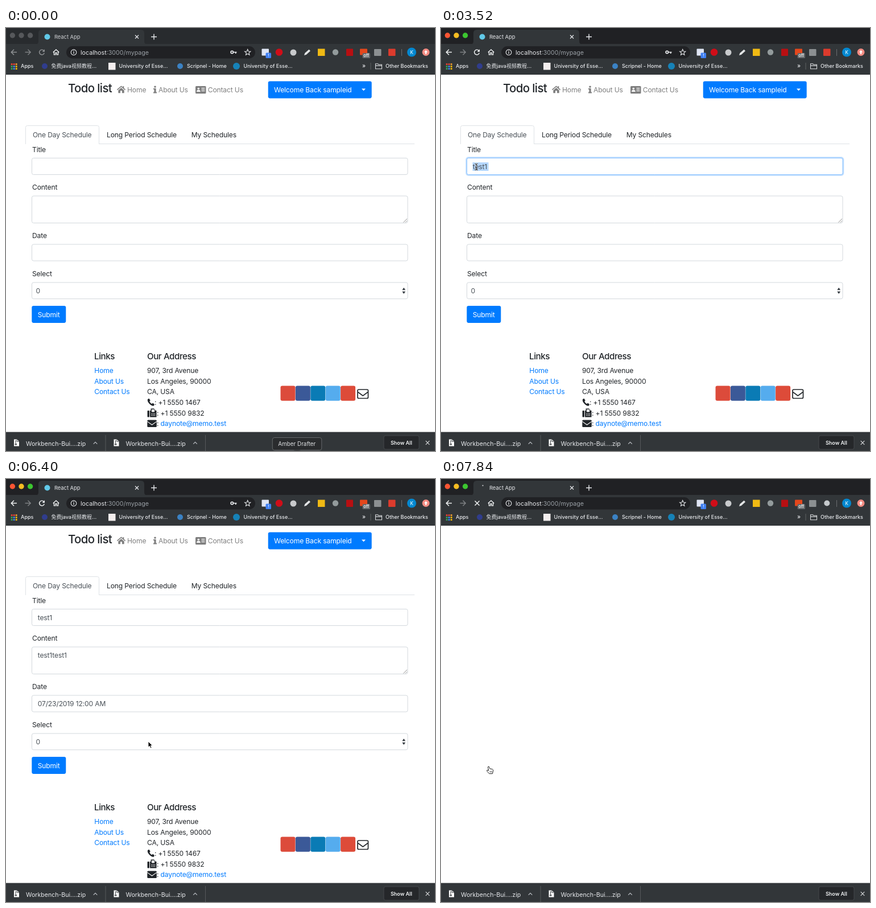
An HTML page with a canvas for the animation above (8 s loop, 754 by 743 pixels).

```html
<!DOCTYPE html>
<html lang="en">
<head>
<meta charset="utf-8">
<title>Todo list</title>
<style>
html, body { margin: 0; width: 100%; height: 100%; overflow: hidden; background: #fff; }
canvas { display: block; width: 754px; height: 743px; }
</style>
</head>
<body>
<canvas id="stage"></canvas>
<script>
const W = 754, H = 743, LOOP = 8000, STEP = 160;
const canvas = document.getElementById('stage');
const ctx = canvas.getContext('2d');
const dpr = window.devicePixelRatio || 1;
canvas.width = W * dpr;
canvas.height = H * dpr;

const BLUE = '#007bff', INK = '#212529', FIELD = '#495057', MUTED = '#7f7f7f';
const BAR = '#323639', LIGHT = '#e8eaed', DIM = '#9aa0a6';

// Moments when the state changes, in ms
const AT = {
  active: 320, title: 1280, select: 3200, content: 4160, paste: 4320, paste2: 4480,
  date: 4960, pick: 5600, closeCal: 6080, open: 6560, close: 7360, submit: 7520, reload: 7840
};
const typed = [[1920, 't'], [2080, 'tes'], [2240, 'test'], [2400, 'test1']];

// Pointer: time, x, y, shape
const route = [
  [480, 480, 690, 'arrow'], [640, 400, 480, 'arrow'], [800, 255, 290, 'arrow'],
  [960, 203, 232, 'beam'], [2400, 203, 232, 'beam'], [2880, 90, 244, 'beam'],
  [3520, 62, 244, 'beam'], [4000, 93, 310, 'beam'], [4480, 93, 310, 'beam'],
  [4800, 112, 390, 'beam'], [4960, 112, 390, 'beam'], [5120, 113, 450, 'arrow'],
  [5280, 113, 504, 'hand'], [5440, 116, 532, 'hand'], [5760, 116, 532, 'hand'],
  [6080, 262, 428, 'arrow'], [6400, 250, 461, 'arrow'], [6560, 250, 461, 'arrow'],
  [7040, 166, 529, 'arrow'], [7200, 166, 529, 'arrow'], [7520, 84, 505, 'hand']
];

function pointerAt(t) {
  let i = -1;
  while (i + 1 < route.length && route[i + 1][0] <= t) i++;
  if (i < 0) return null;
  const a = route[i], b = route[i + 1] || a;
  const k = b === a ? 0 : (t - a[0]) / (b[0] - a[0]);
  return { x: a[1] + (b[1] - a[1]) * k, y: a[2] + (b[2] - a[2]) * k, kind: a[3] };
}

function rect(x, y, w, h, fill) {
  ctx.fillStyle = fill;
  ctx.fillRect(x, y, w, h);
}
function box(x, y, w, h, r, fill, stroke, lw = 1) {
  ctx.beginPath();
  ctx.roundRect(x, y, w, h, r);
  if (fill) { ctx.fillStyle = fill; ctx.fill(); }
  if (stroke) { ctx.strokeStyle = stroke; ctx.lineWidth = lw; ctx.stroke(); }
}
function dot(x, y, r, fill, stroke, lw = 1) {
  ctx.beginPath();
  ctx.arc(x, y, r, 0, Math.PI * 2);
  if (fill) { ctx.fillStyle = fill; ctx.fill(); }
  if (stroke) { ctx.strokeStyle = stroke; ctx.lineWidth = lw; ctx.stroke(); }
}
function shape(d, x, y, fill, stroke, lw = 1) {
  const p = new Path2D(d);
  ctx.save();
  ctx.translate(x, y);
  if (fill) { ctx.fillStyle = fill; ctx.fill(p, 'evenodd'); }
  if (stroke) { ctx.strokeStyle = stroke; ctx.lineWidth = lw; ctx.stroke(p); }
  ctx.restore();
}
function text(s, x, y, size, color, weight = 400, track = 0, align = 'left') {
  ctx.font = `${weight} ${size}px Inter, "Noto Sans CJK SC", "Noto Sans CJK", sans-serif`;
  ctx.letterSpacing = `${track * size}px`;
  ctx.textAlign = align;
  ctx.fillStyle = color;
  ctx.fillText(s, x, y);
  return ctx.measureText(s).width;
}
const body = (s, x, y, color = INK, weight = 400, align = 'left') =>
  text(s, x, y, 12.1, color, weight, -0.012, align);
const heading = (s, x, y, size) => text(s, x, y, size, INK, 500, -0.03);
const small = (s, x, y, color = LIGHT, weight = 500) => text(s, x, y, 9, color, weight);
const cross = (x, y, r, color, lw) =>
  shape(`M${-r} ${-r}L${r} ${r}M${r} ${-r}L${-r} ${r}`, x, y, null, color, lw);

function drawTabs(active, loading) {
  rect(0, 0, W, 29, active ? '#202124' : '#282b2e');
  const lights = active ? ['#fb5533', '#f6bd22', '#3cc630'] : ['#56585b', '#56585b', '#56585b'];
  lights.forEach((c, i) => dot(11.4 + 15.6 * i, 13, 4.7, c));
  shape('M51 29Q57 29 57 23V9Q57 3 63 3H237Q243 3 243 9V23Q243 29 249 29Z', 0, 0, BAR);
  if (loading) dot(73.5, 11.5, 1.1, '#d5d7da');
  else dot(72.5, 15.5, 5, '#61c9e8');
  text('React App', 85, 19, 9.3, active ? LIGHT : '#d0d2d5');
  cross(230, 15.5, 3, LIGHT, 1.2);
  shape('M-5 0H5M0-5V5', 260, 15.5, null, LIGHT, 1.4);
}

function drawToolbar(active, loading) {
  rect(0, 28, W, 54, BAR);
  const nav = active ? '#f1f3f4' : '#8f9295';
  shape('M5 0H-4.6M0-4.7L-4.7 0 0 4.7', 14, 42.5, null, nav, 1.5);
  shape('M-5 0H4.6M0-4.7L4.7 0 0 4.7', 38.5, 42.5, null, '#7f8285', 1.4);
  if (loading) cross(63.5, 42.5, 4, '#f1f3f4', 1.5);
  else {
    shape('M3.4-2.8A4.4 4.4 0 1 0 4.3 1.2', 63, 42.5, null, nav, 1.4);
    shape('M5-5.2V-.7H.5Z', 63, 42.5, nav);
  }
  shape('M-5.3 .3L0-4.6 5.3 .3M-3.6-1V4.4H-1.1V1H1.1V4.4H3.6V-1', 88, 42.5, null, '#f1f3f4', 1.3);

  box(106, 32, 332, 21.5, 10.7, '#202124');
  dot(119, 42.7, 4.8, null, LIGHT, 1.1);
  rect(118.4, 41.8, 1.3, 3.5, LIGHT);
  rect(118.4, 39.7, 1.3, 1.3, LIGHT);
  const w = text('localhost', 131, 46.6, 10.7, LIGHT);
  text(':3000/mypage', 131 + w, 46.6, 10.7, DIM);
  if (!loading) {
    dot(397.3, 42.5, 2.2, null, LIGHT, 1.7);
    shape('M399.5 42.5H405.5M403.7 42.5V45', 0, 0, null, LIGHT, 1.7);
  }
  let star = '';
  for (let i = 0; i < 10; i++) {
    const a = -Math.PI / 2 + i * Math.PI / 5, r = i % 2 ? 2.4 : 5.4;
    star += `${i ? 'L' : 'M'}${r * Math.cos(a)} ${r * Math.sin(a)}`;
  }
  shape(star + 'Z', 424.7, 42.9, null, LIGHT, 1.1);

  // Extensions as plain marks
  box(449.5, 36.5, 12.5, 12, 1, '#dfe5f4');
  box(456.5, 43.5, 9.5, 9.5, 1.5, '#3f7ff2');
  text('!', 461.2, 51, 7, '#fff', 500, 0, 'center');
  dot(480, 42.5, 6.3, '#d00d18');
  dot(505, 43, 5.5, '#c8cacc');
  shape('M-5.5 5.5L-4.2 1.5 3-4.8 5.5-2.3-1.5 4.2Z', 529.5, 42.5, '#e3e5e6');
  box(548, 36.5, 12.5, 12.5, 0, '#f0ba14');
  dot(579, 42.5, 5.2, '#939b9c');
  box(598, 36.5, 12, 12.5, 1, '#b80f12');
  box(622, 36.5, 13, 11, 1, '#e4471c');
  box(626.5, 44, 13.5, 9, 1.5, '#65696c');
  text('off', 633.2, 51, 7.4, '#fff', 500, 0, 'center');
  box(647, 37, 12.5, 12, 1, '#8c9092');
  if (loading) dot(678.3, 42.5, 5, '#c5c9cc');
  else box(672, 36.5, 12.5, 12.5, 1, '#dc3b2d');
  rect(695, 37, 1, 12, '#6b6e71');
  dot(713, 42.5, 8, '#0288d1');
  text('K', 713, 45.6, 8.5, '#fff', 400, 0, 'center');
  dot(738, 42.5, 6.5, '#f28b82');
  shape('M0-3.5L3.3 0H1.2V3.2H-1.2V0H-3.3Z', 738, 42.5, '#fff');

  // Bookmarks
  const grid = ['#ea4335', '#ea4335', '#f29a2e', '#34a853', '#4285f4', '#fbbc05', '#34a853', '#4285f4', '#fbbc05'];
  grid.forEach((c, i) => rect(8.8 + (i % 3) * 4, 62.2 + Math.floor(i / 3) * 4, 2.8, 2.8, c));
  small('Apps', 26, 70.4);
  dot(68, 67, 5, '#303d8d');
  small('免费java视频教程...', 79.5, 70.4);
  box(180, 61, 12.5, 12.5, 0, '#f3eeee');
  small('University of Esse...', 198.5, 70.4);
  dot(306, 67, 5, '#3b82c4');
  small('Scripnel - Home', 318, 70.4);
  dot(405, 67, 6, '#1682b8');
  small('University of Esse...', 417.5, 70.4);
  text('»', 626, 70.4, 10, LIGHT, 500);
  rect(640.5, 61, 1, 12, '#5f6265');
  shape('M-5.5-4.5H-1.5L0-3H5.5V4.5H-5.5ZM-5.5-1.2H5.5', 655, 67.3, null, '#d7d9db', 1.1);
  small('Other Bookmarks', 667, 70.4);
}

function drawDownloads() {
  rect(0, 709.6, W, 34, BAR);
  for (const x of [0, 175.5]) {
    shape('M14 722.5H19.3L23 726.2V734.5H14Z', x, 0, '#fff');
    shape('M19.2 722.7V726.3H22.8', x, 0, null, BAR, .9);
    shape('M17 724V729.5M16 730.5H18.5V732H16Z', x, 0, null, BAR, 1);
    text('Workbench-Bui....zip', 35 + x, 734, 10.6, LIGHT);
    shape('M-3.3 1.7L0-1.7 3.3 1.7', 157 + x, 729, null, '#bdc1c6', 1.2);
    rect(174.5 + x, 715, 1, 28, '#55585b');
  }
  box(664, 716, 62, 24, 3, '#25272a', '#44474a');
  small('Show All', 676, 731.5, '#f1f3f4', 600);
  cross(741, 728.5, 3.3, '#d5d7d9', 1.2);
}

function field(y, h, focus) {
  if (focus) box(43.3, y - 2.3, 665, h + 4.6, 5, 'rgba(0,123,255,.25)');
  box(45.5, y, 660.5, h, 3, '#fff', focus ? '#80bdff' : '#ced4da', .9);
}
function entry(s, y, withCaret) {
  body(s, 55.7, y, FIELD);
  if (withCaret) rect(55.7 + ctx.measureText(s).width, y - 11, 1, 14, '#333');
}

function mail(x, y, w, h) {
  box(x, y, w, h, 1.5, INK);
  shape(`M0 2.6L${w / 2} ${h * .68} ${w} 2.6`, x, y, null, '#fff', 1.1);
}

function drawHeader() {
  heading('Todo list', 109, 113, 20.4);
  shape('M-7.6 0L0-6.6 2.8-4.1V-5.8H4.8V-2.4L7.6 0 6.6 1.2 0-4.5-6.6 1.2ZM-5.2 1.4L0-3.1 5.2 1.4V6.2H1.5V2.3H-1.5V6.2H-5.2Z', 202.5, 108, MUTED);
  body('Home', 213, 112.8, MUTED);
  dot(262, 103.2, 1.7, MUTED);
  shape('M259 106H263.6V112.5H265V114.6H259V112.5H260.4V108H259Z', 0, 0, MUTED);
  body('About Us', 268, 112.8, MUTED);
  box(333, 102, 18.5, 13.3, 1.5, MUTED);
  dot(338.3, 106.5, 1.8, '#fff');
  shape('M335 112Q335 108.8 338.3 108.8T341.7 112Z', 0, 0, '#fff');
  for (const y of [105, 107.5, 110]) rect(343.5, y, 5.8, 1.1, '#fff');
  body('Contact Us', 354.7, 112.8, MUTED);
  box(460.7, 93.5, 182, 29.9, 3.1, BLUE);
  body('Welcome Back sampleid', 471, 113, '#fff');
  shape('M625 106.5H632L628.5 110.2Z', 0, 0, '#fff');

  rect(34, 203, 684, 1, '#dee2e6');
  shape('M34.5 204V174.5Q34.5 171.5 37.5 171.5H160.5Q163.5 171.5 163.5 174.5V204', 0, 0, '#fff', '#dee2e6', 1);
  body('One Day Schedule', 47, 192, FIELD);
  body('Long Period Schedule', 177, 192);
  body('My Schedules', 325.7, 192);
}

function drawForm(t) {
  const on = (a, b) => t >= a && t < b;
  const last = typed.filter(e => e[0] <= t).pop();
  const title = last ? last[1] : '';
  const content = t >= AT.paste2 ? 'test1test1' : t >= AT.paste ? 'test1' : '';
  const inTitle = on(AT.title, AT.content), inContent = on(AT.content, AT.date);

  body('Title', 46, 217.5);
  body('Content', 46, 284.2);
  body('Date', 46, 369.3);
  body('Select', 46, 436);
  field(228.5, 29, inTitle);
  field(295, 47.5, inContent);
  field(380, 29, on(AT.date, AT.closeCal));
  field(447, 28.7, t >= AT.open);

  if (on(AT.select, AT.content)) rect(55.5, 236, 28, 15, '#b4d7fe');
  entry(title, 247.6, inTitle && t < AT.select && !on(1600, 1920));
  entry(content, 314.3, inContent);
  shape('M698.5 341.5L705 335M702 341.5L705 338.5', 0, 0, null, '#777', .8);
  if (t >= AT.pick) entry('07/23/2019 12:00 AM', 399.3);
  body(t >= AT.close ? '4' : '0', 52.5, 466, FIELD);
  shape('M696.3 460.3L699.2 456 702.1 460.3ZM696.3 462.7L699.2 467 702.1 462.7Z', 0, 0, '#343a40');
  box(45.3, 488, 60, 29.9, 3.1, t >= AT.submit ? '#0069d9' : BLUE);
  body('Submit', 55.7, 508, '#fff');
}

function drawFooter() {
  heading('Links', 155, 582, 15.2);
  heading('Our Address', 248, 582, 15.2);
  ['Home', 'About Us', 'Contact Us'].forEach((s, i) => body(s, 155.3, 606.2 + 18.6 * i, BLUE));
  ['907, 3rd Avenue', 'Los Angeles, 90000', 'CA, USA'].forEach((s, i) => body(s, 248, 606.2 + 18.6 * i));
  shape('M249 652L251.5 650.8 253.7 654.3 252.2 656Q253.7 659 256.5 660.3L258 658.6 261 661.2 259.8 663.5Q256.5 664.7 252.2 660.3T249 652Z', 0, 0, INK);
  body(': +1 5550 1467', 261, 662);
  box(248.5, 672, 3.5, 11.5, 1, INK);
  shape('M253 672H254.5V668.5H260L262.3 670.8V672H264.5V683.5H253ZM256 670V674.5H261V670Z', 0, 0, INK);
  for (let i = 0; i < 6; i++) rect(255.5 + (i % 3) * 2.6, 677 + Math.floor(i / 3) * 2.7, 1.4, 1.4, '#fff');
  body(': +1 5550 9832', 265, 680.7);
  mail(248.3, 688.5, 16.5, 12.5);
  body(':', 265, 699);
  body('daynote@memo.test', 271.5, 699, BLUE);

  ['#dc4b3b', '#3b5998', '#0a7bb5', '#55acee', '#dd4b39'].forEach((c, i) =>
    box(482.5 + 26.4 * i, 628.5, 26, 26.3, 3, c));
  box(618, 635, 18.5, 15.5, 2, null, INK, 1.7);
  shape('M618.5 639.5L627.3 646 636 639.5', 0, 0, null, INK, 1.6);
}

function shadowed(color, blur, dy, paint) {
  ctx.save();
  ctx.shadowColor = color;
  ctx.shadowBlur = blur * dpr;
  ctx.shadowOffsetY = dy * dpr;
  paint();
  ctx.restore();
}

function drawCalendar(t, p) {
  shadowed('rgba(0,0,0,.16)', 3, 1, () => rect(46, 410, 193, 207, '#fff'));
  box(46, 410, 193, 207, 0, null, '#f4f4f4');
  const mid = (s, x, y, c, w) => body(s, x, y, c, w, 'center');
  const colX = c => 63 + 26.4 * c;
  text('‹', 63, 431.5, 16, INK, 600, 0, 'center');
  text('›', 221.4, 431.5, 16, INK, 600, 0, 'center');
  mid('July 2019', 142.2, 431, INK, 600);
  ['Su', 'Mo', 'Tu', 'We', 'Th', 'Fr', 'Sa'].forEach((s, c) => mid(s, colX(c), 455, INK, 600));
  const hoverCol = Math.floor((p.x - 49.8) / 26.4), hoverRow = Math.floor((p.y - 461.8) / 21.7);
  for (let d = 0; d < 42; d++) {
    const c = d % 7, r = Math.floor(d / 7), y = 461.8 + 21.7 * r;
    const picked = d === 23 && t >= AT.pick;
    if (picked) rect(colX(c) - 13.2, y, 26.4, 21.7, '#428bca');
    else if (c === hoverCol && r === hoverRow) rect(colX(c) - 13.2, y, 26.4, 21.7, '#eee');
    const label = d === 0 ? 30 : d > 31 ? d - 31 : d;
    mid(String(label), colX(c), y + 15, picked ? '#fff' : d < 2 || d > 31 ? '#999' : INK);
    if (d === 2) shape('M126 474.5V479.5H121Z', 0, 0, '#428bca');
  }
  mid('12:00 AM', 142.2, 606.7);
}

// Page colour showing through the frosted menu: a core with a faint halo
function glow(x, y, r, rgb, alpha) {
  const g = ctx.createRadialGradient(x, y, 0, x, y, r);
  g.addColorStop(0, `rgba(${rgb},${alpha})`);
  g.addColorStop(.62, `rgba(${rgb},${alpha * .6})`);
  g.addColorStop(.7, `rgba(${rgb},${alpha * .2})`);
  g.addColorStop(1, `rgba(${rgb},0)`);
  rect(x - r, y - r, 2 * r, 2 * r, g);
}

function drawMenu(p) {
  const frame = () => ctx.roundRect(37, 449.3, 662, 178.7, 4);
  shadowed('rgba(0,0,0,.38)', 16, 4, () => {
    ctx.beginPath();
    frame();
    ctx.fillStyle = '#838584';
    ctx.fill();
  });
  ctx.save();
  ctx.beginPath();
  frame();
  ctx.clip();
  glow(75, 498, 60, '86,119,172', .65);
  glow(180, 625, 34, '100,120,160', .35);
  glow(297, 616, 62, '112,110,112', .6);
  const row = Math.max(0, Math.min(9, Math.floor((p.y - 453) / 17)));
  rect(37, 453.4 + 17 * row, 662, 17.2, '#4f97fc');
  ctx.restore();
  for (let i = 0; i < 10; i++) text(String(i), 54, 465.7 + 17 * i, 12.3, '#fff', 500);
  shape('M42 461.5L44.5 464.3 49 457.7', 0, 0, null, '#fff', 1.6);
}

function drawPointer({ x, y, kind }) {
  if (kind === 'beam') {
    const d = 'M-2.7-5.5Q0-5.5 0-3.8Q0-5.5 2.7-5.5M0-4V4M-2.7 5.5Q0 5.5 0 3.8Q0 5.5 2.7 5.5M-1.4 1.7H1.4';
    shape(d, x, y, null, 'rgba(255,255,255,.8)', 2.4);
    shape(d, x, y, null, '#222', 1.1);
  } else if (kind === 'arrow') {
    shape('M0 0V10.2L2.4 8 4.1 11.8 6 11 4.3 7.3H7.4Z', x, y, '#000', '#fff', .9);
  } else {
    shape('M-1.6 1.2Q-1.4-.4 .2 0L2 4 6.2 4.6Q8.3 5.5 7.6 8.2L6.4 12.6H.8L-3 8.3Q-4.2 6.2-2 6.2L-.2 7.2Z', x, y, '#fff', '#222', 1);
    shape('M2 8V10.5M3.7 8V10.5M5.3 8V10.5', x, y, null, '#444', .8);
  }
}

function drawHint() {
  box(468.3, 719.5, 86.5, 22, 3.5, '#2a2c2e', '#66696b');
  shape('M505 741.5L511.5 743 518 741.5', 0, 0, '#2a2c2e');
  text('Amber Drafter', 511.3, 734, 9.9, '#dfe1e3', 400, 0, 'center');
}

function draw(t) {
  const active = t >= AT.active, loading = t >= AT.reload, p = pointerAt(t);
  ctx.setTransform(dpr, 0, 0, dpr, 0, 0);
  rect(0, 0, W, H, '#fff');
  drawTabs(active, loading);
  drawToolbar(active, loading);
  if (!loading) {
    drawHeader();
    drawForm(t);
    drawFooter();
    if (t >= AT.date && t < AT.closeCal) drawCalendar(t, p);
    if (t >= AT.open && t < AT.close) drawMenu(p);
  }
  drawDownloads();
  if (!active) drawHint();
  if (p) drawPointer(p);
}

function tick() {
  const t = performance.now() % LOOP;
  draw(Math.floor(t / STEP) * STEP);
  requestAnimationFrame(tick);
}
tick();
</script>
</body>
</html>
```
